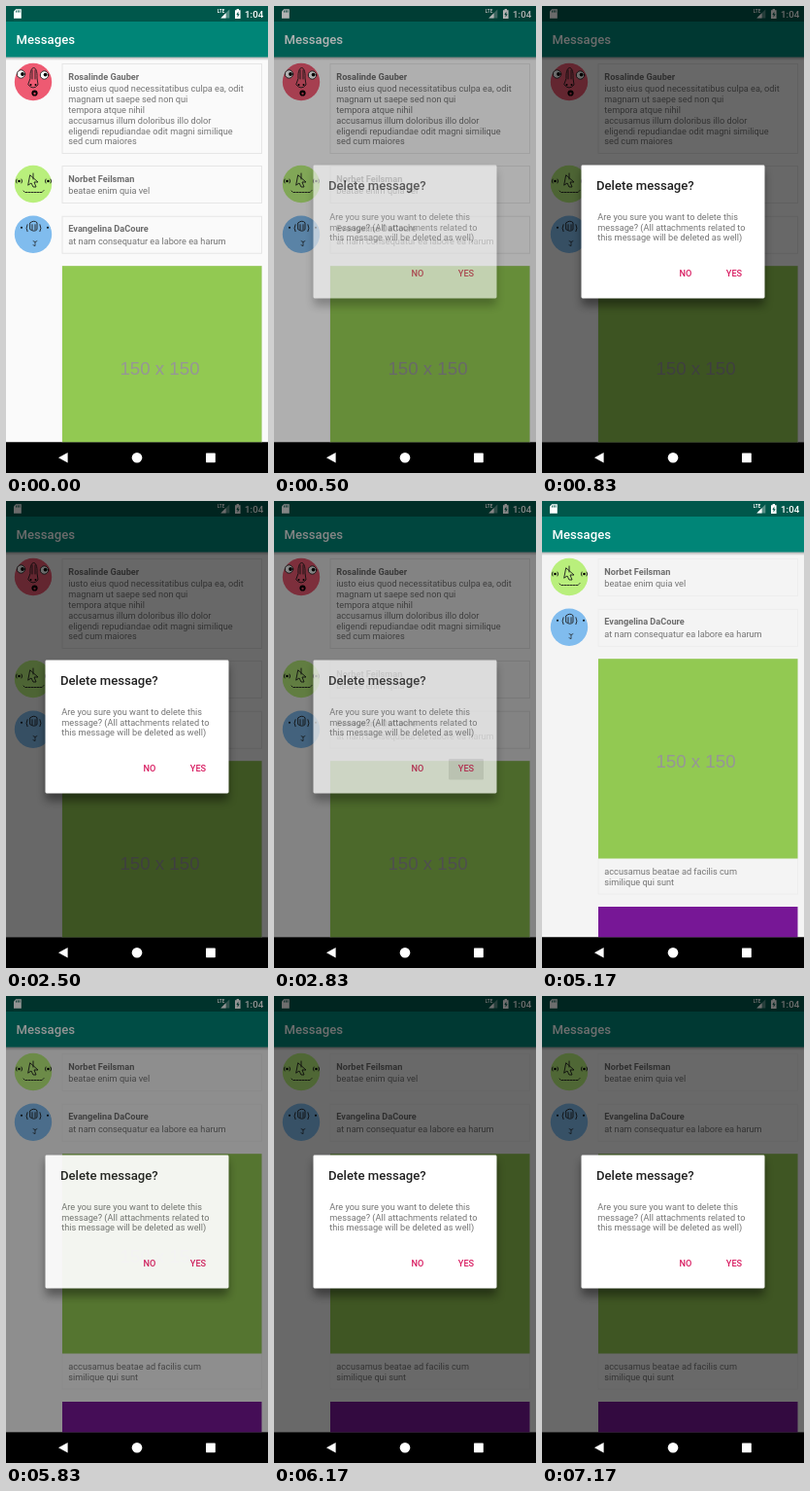
These frames come from a looping animation (270 px wide and 480 px high, 7.51 s). An HTML page:

```html
<!DOCTYPE html>
<html lang="en">
<head>
<meta charset="utf-8">
<title>Messages</title>
<style>
  html, body { margin: 0; width: 100%; height: 100%; overflow: hidden; background: #000; }
  svg { display: block; width: 100%; height: 100%; }
  text { font: 9.19px Roboto, sans-serif; fill: #747474; }
  .name { font-weight: 700; fill: #6c6c6c; }
  .bar { font-weight: 500; font-size: 13.13px; fill: #fff; }
  .clock { font-weight: 500; font-size: 9.8px; fill: #fff; }
  .lte { font-weight: 700; font-size: 4.6px; fill: #fff; }
  .size { font: 18.7px "Liberation Sans", Arial, sans-serif; fill: #969696; text-anchor: middle; }
  .title { font-weight: 500; font-size: 13.13px; fill: #212121; }
  .button { font-weight: 500; fill: #d81b60; text-anchor: middle; }
  .card { fill: none; stroke: #e6e6e6; }
  .ink { fill: none; stroke: #1c1c1c; stroke-width: .9; stroke-linecap: round; stroke-linejoin: round; }
</style>
</head>
<body>
<svg viewBox="0 0 270 480" preserveAspectRatio="none">
  <defs>
    <linearGradient id="fall" x2="0" y2="1">
      <stop stop-color="#000" stop-opacity=".28"/>
      <stop offset="1" stop-color="#000" stop-opacity="0"/>
    </linearGradient>
    <filter id="soft" x="-20%" y="-20%" width="140%" height="150%">
      <feGaussianBlur stdDeviation="5"/>
    </filter>
    <clipPath id="view"><rect y="52.5" width="270" height="396"/></clipPath>
  </defs>

  <rect id="page" width="270" height="448.5"/>
  <g clip-path="url(#view)">
    <g id="first"></g>
    <g id="rest"></g>
  </g>

  <rect width="270" height="16" fill="#00574b"/>
  <rect y="16" width="270" height="36.6" fill="#008577"/>
  <rect y="52.6" width="270" height="3.4" fill="url(#fall)"/>
  <text class="bar" x="10.5" y="39.3">Messages</text>

  <g fill="#fff">
    <path d="M10.2 3.2h5.6v9.6H8V5.6z"/>
    <path d="M10.6 4.6v2M12.3 4.4v2.2M14 4.4v2.2" stroke="#00574b" stroke-width=".9"/>
    <text class="lte" x="217.8" y="7.2">LTE</text>
    <path d="M230.3 3.6v9h-9z" opacity=".35"/>
    <path d="M226.6 7.3v5.3h-5.3z"/>
    <path d="M236 4.2h1.6V3h2.4v1.2h1.6v8.8H236z"/>
    <path d="M239.4 5.6l-2 3.4h1.2v2.8l2-3.6h-1.2z" fill="#00574b"/>
    <text class="clock" x="246" y="12">1:04</text>
  </g>

  <rect id="dim" width="270" height="448.5"/>

  <g id="dialog">
    <rect x="41" y="170" width="188" height="138" fill="#000" opacity=".42" filter="url(#soft)"/>
    <rect x="40.5" y="163.5" width="189" height="137" rx="1.4" fill="#fff"/>
    <rect id="press" x="180" y="265" width="36" height="21.5" rx="1.3" fill="#000" opacity=".1"/>
    <text class="title" x="56" y="189">Delete message?</text>
    <g id="body"></g>
    <text class="button" x="148" y="277.8">NO</text>
    <text class="button" x="198" y="277.8">YES</text>
  </g>

  <rect y="448.5" width="270" height="31.5"/>
  <g fill="#fff">
    <path d="M54 464.2l9.6-5.2v10.4z"/>
    <circle cx="135" cy="464.2" r="5.3"/>
    <rect x="206" y="459.4" width="9.8" height="9.8" rx=".6"/>
  </g>
</svg>

<script>
const el = id => document.getElementById(id);

const lines = (x, y, list) =>
  list.map((s, i) => `<text x="${x}" y="${y + i * 10.78}">${s}</text>`).join('');

const card = (y, h) => `<rect class="card" x="58" y="${y + .5}" width="205.5" height="${h}"/>`;

// Faces are drawn around the avatar centre
const faces = {
  red: `<g class="ink"><path d="M-3-4C-4-18 5-18 4-4L5 3Q0 9-5 3z M-1-12V-3M2-12V-3"/>
    <circle cx="-12.5" cy="-8" r="4.2" fill="#fff"/><circle cx="11.5" cy="-7" r="4.2" fill="#fff"/></g>
    <circle cx="-11" cy="-8" r="1.9"/><circle cx="12.6" cy="-7.4" r="1.9"/>
    <circle cx="-2.5" cy="3" r="1"/><circle cx="2.5" cy="3" r="1"/>
    <circle cx="1.5" cy="11.5" r="3.1"/><circle cx="1.5" cy="12" r="1.2" fill="#d8405c"/>`,
  green: `<g class="ink"><path d="M-3-9L5-2 1-2 3 3 0 3-2-1-5 1z M0-11V-5"/>
    <path d="M-17-5q-1.500 2 0 4M-12-5q1.500 2 0 4M13-5q-1.500 2 0 4M18-5q1.500 2 0 4"/>
    <path d="M-10 7l1 1M-8 8.500H9M10 7.500l1-1" stroke-dasharray="2 1"/></g>
    <circle cx="-14.500" cy="-3" r="1.3"/><circle cx="15.500" cy="-3" r="1.3"/>`,
  blue: `<g class="ink"><path d="M-3-12q4-3 7 0v7q-3 3-7 0z M-1-10v5M2-10v5M-6-10q-2 4 0 7M7-10q2 4 0 7"/>
    <path d="M0 7q2 2 4 0M2 8v4l-2-1" stroke-width=".7"/></g>
    <circle cx="-12" cy="-7" r="1"/><circle cx="15" cy="-7" r="1"/>`
};

const avatar = (y, fill, face) =>
  `<g transform="translate(28 ${y})"><circle r="19.2" fill="${fill}"/>${faces[face]}</g>`;

const message = (y, h, name, text, fill, face) => card(y, h) + avatar(y + 19, fill, face) +
  `<text class="name" x="64.3" y="${y + 16.5}">${name}</text>` + lines(64.3, y + 29.4, text);

const picture = (y, fill) => `<rect x="58" y="${y}" width="205.5" height="205.3" fill="${fill}"/>` +
  `<text class="size" x="158.5" y="${y + 112}">150 x 150</text>`;

el('first').innerHTML = message(59, 92, 'Rosalinde Gauber', [
  'iusto eius quod necessitatibus culpa ea, odit',
  'magnam ut saepe sed non qui',
  'tempora atque nihil',
  'accusamus illum doloribus illo dolor',
  'eligendi repudiandae odit magni similique',
  'sed cum maiores'
], '#ee5a72', 'red');

el('rest').innerHTML =
  message(164, 38, 'Norbet Feilsman', ['beatae enim quia vel'], '#b9ef7c', 'green') +
  message(215.7, 38, 'Evangelina DaCoure', ['at nam consequatur ea labore ea harum'], '#80bcee', 'blue') +
  card(267, 241.500) + picture(267.2, '#92c952') +
  lines(64.3, 489, ['accusamus beatae ad facilis cum', 'similique qui sunt']) +
  picture(522, '#771796');

el('body').innerHTML = lines(57.3, 219.8, [
  'Are you sure you want to delete this',
  'message? (All attachments related to',
  'this message will be deleted as well)'
]);

// start ms, dim, dialog opacity, list shift, first message kept, button pressed
const steps = [
  [0,    0,   0,   0,    1, 0],
  [500,  .3,  .6,  0,    1, 0],
  [830,  .58, 1,   0,    1, 0],
  [2830, .48, .72, 0,    1, 1],
  [3170, 0,   0,   -30,  0, 0],
  [3500, 0,   0,   -105, 0, 0],
  [5830, .42, .93, -105, 0, 0],
  [6170, .57, 1,   -105, 0, 0]
];
const LOOP = 7510;
const cards = document.querySelectorAll('.card');
const start = performance.now();
let shown;

function draw(now) {
  const t = Math.max(0, now - start) % LOOP;
  const step = steps.findLast(s => s[0] <= t);
  if (step !== shown) {
    shown = step;
    const [, dim, dialog, shift, kept, pressed] = step;
    const settled = shift === -105;
    el('dim').setAttribute('opacity', dim);
    el('dialog').setAttribute('opacity', dialog);
    el('rest').setAttribute('transform', `translate(0 ${shift})`);
    el('first').setAttribute('opacity', kept);
    el('press').setAttribute('visibility', pressed ? 'inherit' : 'hidden');
    el('page').setAttribute('fill', settled ? '#f4f4f4' : '#fafafa');
    cards.forEach(c => c.style.stroke = settled ? '#ededed' : '#e6e6e6');
  }
  requestAnimationFrame(draw);
}
draw(start);
</script>
</body>
</html>
```
